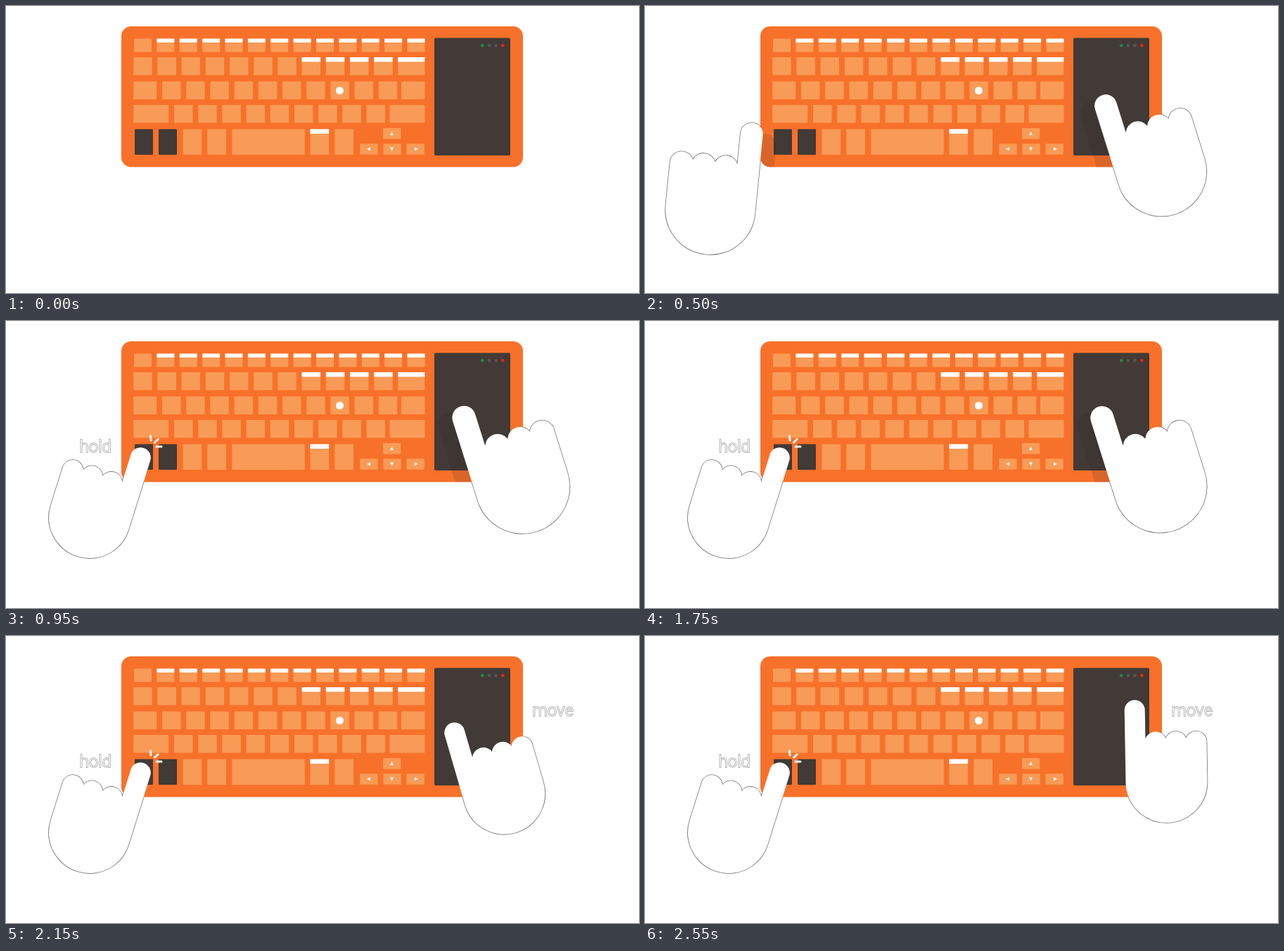
An HTML page that plays this animation: 900 px wide and 409 px high, repeating every 4.95 s.

```html
<!DOCTYPE html>
<html lang="en">
<head>
<meta charset="utf-8">
<title>Hold and move</title>
<style>
  html, body { margin: 0; width: 100%; height: 100%; overflow: hidden; background: #fff; }
  svg { display: block; width: 100vw; height: 100vh; }
  .outline { fill: none; stroke: #777; stroke-width: 1.6; vector-effect: non-scaling-stroke; }
  .shadow { fill: #231f20; opacity: .14; }
  .hand { fill: #fff; }
  text { font: 300 24px Roboto, "Open Sans", sans-serif; fill: #fff; stroke: #999; stroke-width: 1.4; paint-order: stroke; }
</style>
</head>
<body>
<svg viewBox="0 0 900 409">
  <defs>
    <path id="shape" vector-effect="non-scaling-stroke" d="M-58 0V-103A14.5 14.5 0 0 1-29-103V-62A15.5 15.5 0 0 1 0-62A15.5 15.5 0 0 1 29-62A15 15 0 0 1 58-57V0A58 58 0 0 1-58 0Z"/>
    <clipPath id="board"><rect x="164" y="29" width="571" height="200.5" rx="14"/></clipPath>
  </defs>
  <g id="outlines"></g>
  <rect x="164" y="29" width="571" height="200.5" rx="14" fill="#f8712a"/>
  <g id="keys"></g>
  <rect x="609" y="45.5" width="108" height="167.5" rx="2" fill="#413a36"/>
  <g id="lights"></g>
  <circle cx="474.5" cy="120.5" r="5.5" fill="#fff"/>
  <path fill="#fff" d="M546 184h5l-2.5-5ZM546 201.500h5l-2.500 5ZM518 201.300v5l-5-2.500ZM581 201.300v5l5-2.500Z"/>
  <g id="shadows" clip-path="url(#board)"></g>
  <g id="hands"></g>
  <g id="hold">
    <text x="104.500" y="187">hold</text>
    <path d="M205.500 164l.5 6M211.500 173l4.700-4.500M214 179h7" stroke="#fff" stroke-width="3" stroke-linecap="round"/>
  </g>
  <text id="move" x="748.500" y="114">move</text>
</svg>
<script>
const $ = id => document.getElementById(id);

function add(parent, tag, attrs) {
  const el = document.createElementNS('http://www.w3.org/2000/svg', tag);
  for (const name in attrs) el.setAttribute(name, attrs[name]);
  return $(parent).appendChild(el);
}

function key(x, y, width, height, { fill = '#f89b57', cap = 0 } = {}) {
  add('keys', 'rect', { x, y, width, height, rx: 1, fill });
  if (cap) add('keys', 'rect', { x, y, width, height: cap, fill: '#fff' });
}

function row(count, x, pitch, y, width, height, capFrom = Infinity, cap = 0) {
  for (let i = 0; i < count; i++)
    key(x + i * pitch, y, width, height, { cap: i >= capFrom ? cap : 0 });
}

function buildKeyboard() {
  row(13, 182, 32.38, 46.5, 25, 19, 1, 5.5);
  row(11, 181.2, 34.2, 73, 26.5, 25.5, 7, 6.5);
  key(557.3, 73, 38, 25.5, { cap: 6.5 });
  key(181.2, 107.5, 33, 25.5);
  row(10, 222, 34.2, 107.5, 26.5, 25.5);
  key(562, 107.5, 33.5, 25.5);
  key(181.2, 141, 50, 25.5);
  row(9, 239, 34.2, 141, 26.5, 25.5);
  key(545.5, 141, 50, 25.5);
  for (const x of [183, 217]) key(x, 175.5, 26, 36.5, { fill: '#413a36' });
  for (const x of [251.5, 286.3, 467.3]) key(x, 175.5, 26.7, 36.5);
  key(321.3, 175.5, 103.5, 36.5);
  key(432.5, 175.5, 26.7, 36.5, { cap: 6.5 });
  key(536, 174, 25.3, 15.5);
  row(3, 503.3, 33.1, 196.2, 25.3, 15.5);
  ['#1f8a43', '#5b5551', '#5b5551', '#e3231c'].forEach((fill, i) =>
    add('lights', 'circle', { cx: 677.2 + i * 9.7, cy: 56.3, r: 2.4, fill }));
}

function makeHand(flip, shadowX, shadowY) {
  const layer = (parent, name) => add(parent, 'use', { href: '#shape', class: name });
  const outline = layer('outlines', 'outline');
  const shadow = layer('shadows', 'shadow');
  const fill = layer('hands', 'hand');
  return ([x, y, angle, scale], lift) => {
    const place = (dx, dy) =>
      `translate(${x + dx} ${y + dy}) rotate(${angle}) scale(${flip * scale} ${scale})`;
    outline.setAttribute('transform', place(0, 0));
    fill.setAttribute('transform', place(0, 0));
    shadow.setAttribute('transform', place(shadowX * lift, shadowY * lift));
    shadow.style.display = lift > 0 ? '' : 'none';
  };
}

const LOOP = 4950, STEP = 50;
const progress = (t, from, to) => Math.min(1, Math.max(0, (t - from) / (to - from)));
const smooth = p => p * p * (3 - 2 * p);
const mix = (a, b, p) => a.map((v, i) => v + (b[i] - v) * p);
const show = (id, on) => { $(id).style.display = on ? '' : 'none'; };

// Poses: palm x, palm y, angle, scale
const left = { start: [94.5, 290, -6.5, 1], raised: [92, 290.5, 12.3, 1.153], pressed: [119, 280, 17.4, 1] };
const right = {
  start: [734.5, 235.5, -17.4, 1], raised: [734.5, 236, -17.4, 1.153],
  pressed: [705.7, 225.8, -17.4, 1], moved: [741.5, 208, -1, 1]
};

buildKeyboard();
const drawLeft = makeHand(-1, 19, 16);
const drawRight = makeHand(1, -20.5, 10);

function render(time) {
  const t = Math.floor((time % LOOP) / STEP) * STEP;
  const rise = smooth(progress(t, 200, 700));
  const hold = smooth(progress(t, 700, 950));
  const touch = smooth(progress(t, 1700, 2000));
  const p = progress(t, 2100, 2550);
  const move = (p + smooth(p)) / 2;

  for (const id of ['outlines', 'shadows', 'hands']) show(id, t >= 200);
  drawLeft(mix(mix(left.start, left.raised, rise), left.pressed, hold), 1 - hold);
  drawRight(mix(mix(mix(right.start, right.raised, rise), right.pressed, touch), right.moved, move), 1 - touch);
  show('hold', t >= 950);
  show('move', t >= 2000);
}

const began = performance.now();
function tick() {
  render(performance.now() - began);
  requestAnimationFrame(tick);
}
tick();
</script>
</body>
</html>
```
